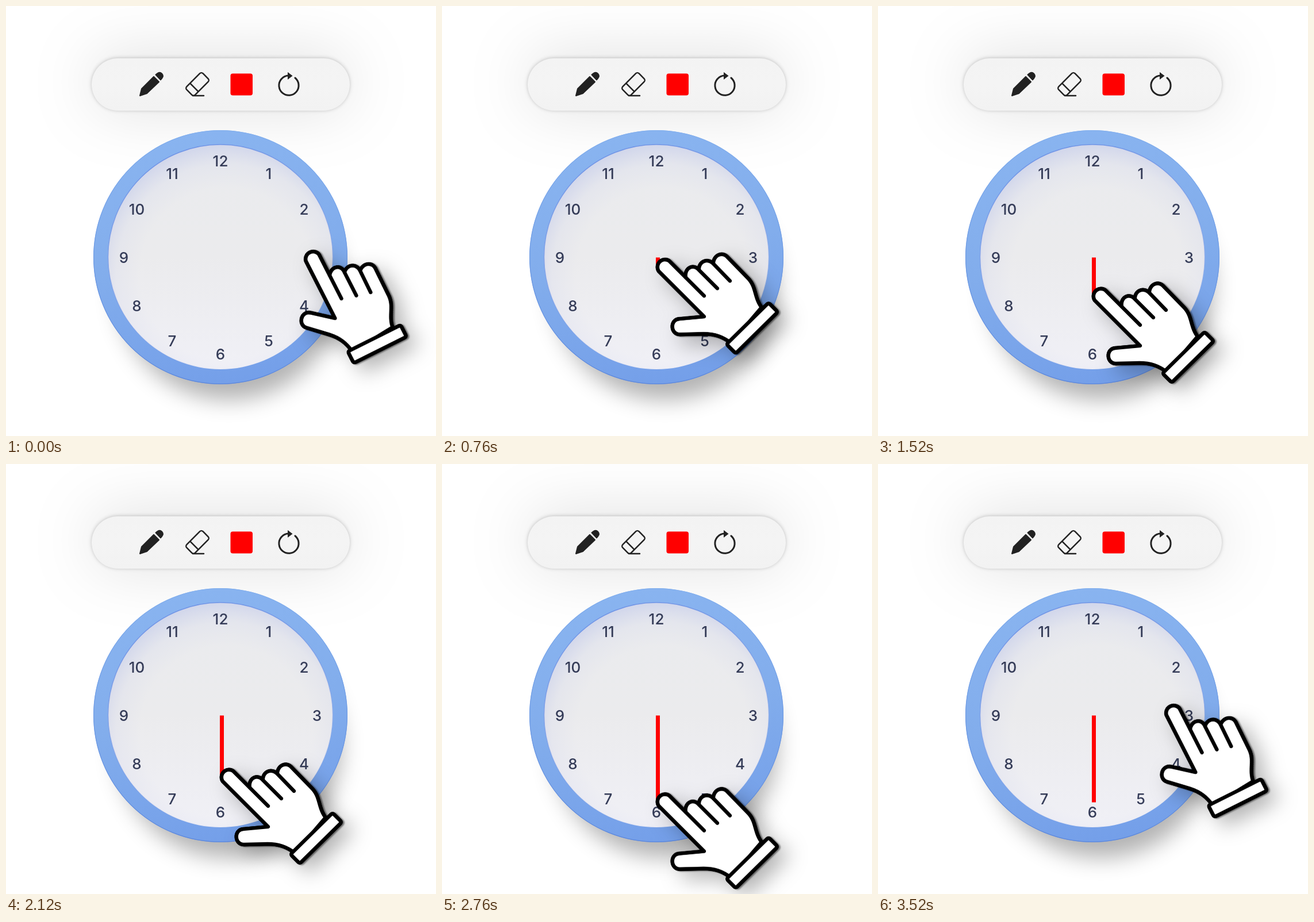
Animation, 748 px wide and 748 px high, one loop 5.04 s. Source, as an HTML page with a canvas:

```html
<!DOCTYPE html>
<html lang="en">
<head>
<meta charset="utf-8">
<title>Drawing on a clock</title>
<style>
html, body { margin: 0; width: 100%; height: 100%; overflow: hidden; background: #fff; }
canvas { display: block; }
</style>
</head>
<body>
<canvas id="stage" width="748" height="748"></canvas>
<script>
const SIZE = 748, LOOP = 5040, STEP = 40;
const INK = '#222';
const ctx = document.getElementById('stage').getContext('2d');

function layer(scale, draw) {
  const canvas = document.createElement('canvas');
  canvas.width = canvas.height = SIZE * scale;
  const c = canvas.getContext('2d');
  c.scale(scale, scale);
  draw(c);
  return canvas;
}

function shadow(c, color, blur, x, y) {
  c.shadowColor = color;
  c.shadowBlur = blur;
  c.shadowOffsetX = x;
  c.shadowOffsetY = y;
}

function fade(gradient, ...colors) {
  colors.forEach((color, i) => gradient.addColorStop(i / (colors.length - 1), color));
  return gradient;
}

function disc(c, x, y, r) {
  c.beginPath();
  c.arc(x, y, r, 0, Math.PI * 2);
}

function pill(c, x, y, w, h, r) {
  c.beginPath();
  c.roundRect(x, y, w, h, r);
}

function drawToolbar(c) {
  c.fillStyle = fade(c.createLinearGradient(0, 90, 0, 182), '#f3f3f3', '#f4f4f4', '#f2f2f2');
  pill(c, 149, 91, 449, 91, 45.5);
  c.save();
  shadow(c, 'rgba(0,0,0,.13)', 110, 0, -4);
  c.fill();
  shadow(c, 'rgba(0,0,0,.22)', 6, 0, -0.5);
  c.fill();
  c.restore();

  c.lineJoin = c.lineCap = 'round';
  c.fillStyle = c.strokeStyle = INK;

  // pencil
  c.lineWidth = 2;
  const pencil = new Path2D('M233 156 L236 144 L257 123 L266 132 L245 152Z' +
    'M260.5 119.5 L263 117.5 C269 113 276 120 271 126 L269 128.5Z');
  c.fill(pencil);
  c.stroke(pencil);

  // eraser
  c.save();
  c.lineWidth = 2.5;
  c.stroke(new Path2D('M325 156 H344'));
  c.translate(333, 136);
  c.rotate(-Math.PI / 4);
  pill(c, -20, -10.25, 40, 20.5, 4);
  c.moveTo(-8, -10.25);
  c.lineTo(-8, 10.25);
  c.stroke();
  c.restore();

  // colour
  c.fillStyle = '#f00';
  pill(c, 390.5, 117.5, 38.5, 38, 4);
  c.fill();

  // reset
  c.fillStyle = INK;
  c.lineWidth = 3;
  c.beginPath();
  c.arc(492, 138.2, 17.1, -0.88, Math.PI * 1.5);
  c.stroke();
  c.fill(new Path2D('M490 115 L498.500 121.500 L490 128Z'));
}

function drawClock(c) {
  // cast shadow, smaller than the rim so that it only shows below
  c.save();
  shadow(c, 'rgba(0,0,0,.3)', 38, 15, 53);
  disc(c, 373, 437, 195);
  c.fill();
  c.restore();

  c.fillStyle = fade(c.createLinearGradient(300, 216, 390, 658), '#89b4f0', '#82adec', '#749fe9');
  disc(c, 373, 437, 221);
  c.fill();
  c.lineWidth = 1.2;
  c.strokeStyle = fade(c.createLinearGradient(0, 216, 0, 658), '#84b0ee', '#6f9be4', '#5c87dc');
  disc(c, 373, 437, 220.4);
  c.stroke();

  c.fillStyle = fade(c.createLinearGradient(0, 241, 0, 632), '#eaebee', '#ebebed', '#f0f0f6');
  disc(c, 373, 436.5, 195.5);
  c.fill();
  c.fillStyle = fade(c.createRadialGradient(383, 466, 150, 383, 466, 232),
    'rgba(175,185,232,0)', 'rgba(175,185,232,.1)', 'rgba(165,178,230,.42)');
  c.fill();
  c.lineWidth = 1.5;
  c.strokeStyle = fade(c.createLinearGradient(300, 241, 440, 632),
    'rgba(112,148,230,1)', 'rgba(112,148,230,.6)', 'rgba(112,148,230,0)');
  c.stroke();

  c.fillStyle = '#353c58';
  c.font = '500 26px Inter, "Open Sans", sans-serif';
  c.textAlign = 'center';
  for (let hour = 1; hour <= 12; hour++) {
    const a = hour * Math.PI / 6;
    c.fillText(hour, 373 + 168 * Math.sin(a), 446.5 - 168 * Math.cos(a));
  }
}

const PIVOT = { x: 480, y: 545 };

function drawHand(c) {
  const palm = new Path2D('M377 483 A13 13 0 0 1 395 465 L424 494 C421 478 437 469 447 481' +
    'C446 467 461 459 472 470 C472 455 488 448 497 459 L533 496 C547 511 543 529 556 546' +
    'L503 608 C488 597 475 592 455 592 L414 593 C397 593 396 567 413 566 L456 562Z');
  const grooves = new Path2D('M424 494 L456 526 M447 481 L479 513 M472 470 L501 500');
  const cuff = new Path2D('M565 541 Q568 538 571 541 L581 551 Q584 554 581 557' +
    'L514 623 Q511 626 508 623 L498 613 Q495 610 498 607Z');
  c.lineJoin = c.lineCap = 'round';
  c.lineWidth = 6.4;
  c.fillStyle = '#fff';
  c.strokeStyle = '#000';
  c.fill(palm);
  c.stroke(palm);
  c.stroke(grooves);
  c.fill(cuff);
  c.stroke(cuff);
}

const scene = layer(1, c => {
  c.fillStyle = '#fff';
  c.fillRect(0, 0, SIZE, SIZE);
  drawToolbar(c);
  drawClock(c);
});
const hand = layer(2, drawHand);

// time, hand centre x, y, tilt in degrees
const KEYS = [
  [0, 600.5, 534.5, 18],
  [440, 518.8, 519.7, 5.5],
  [640, 480, 515.3, 0],
  [2840, 480, 662, 0],
  [2880, 480, 662, 0],
  [3520, 580.5, 527.5, 18],
  [LOOP, 580.5, 527.5, 18]
];

function poseAt(t) {
  const i = KEYS.findIndex(k => k[0] > t);
  const a = KEYS[i - 1], b = KEYS[i];
  const f = (t - a[0]) / (b[0] - a[0]);
  return a.map((v, n) => v + (b[n] - v) * f);
}

function drawLine(t) {
  const f = Math.min(1, (t - 640) / 2200);
  if (f <= 0) return;
  ctx.fillStyle = '#f00';
  ctx.fillRect(372, 437.5, 7, 4 + 147 * f);
}

function placeHand(t) {
  const [, x, y, tilt] = poseAt(t);
  ctx.save();
  ctx.imageSmoothingQuality = 'high';
  ctx.translate(x, y);
  ctx.rotate(tilt * Math.PI / 180);
  ctx.translate(-PIVOT.x, -PIVOT.y);
  shadow(ctx, 'rgba(0,0,0,.3)', 36, 17, 14);
  ctx.drawImage(hand, 0, 0, SIZE, SIZE);
  shadow(ctx, 'rgba(0,0,0,.5)', 2, 3, 1);
  ctx.drawImage(hand, 0, 0, SIZE, SIZE);
  ctx.restore();
}

const start = performance.now();

function frame() {
  const elapsed = (performance.now() - start) % LOOP;
  const t = Math.floor(elapsed / STEP) * STEP;
  ctx.drawImage(scene, 0, 0);
  drawLine(t);
  placeHand(t);
  requestAnimationFrame(frame);
}
frame();
</script>
</body>
</html>
```
